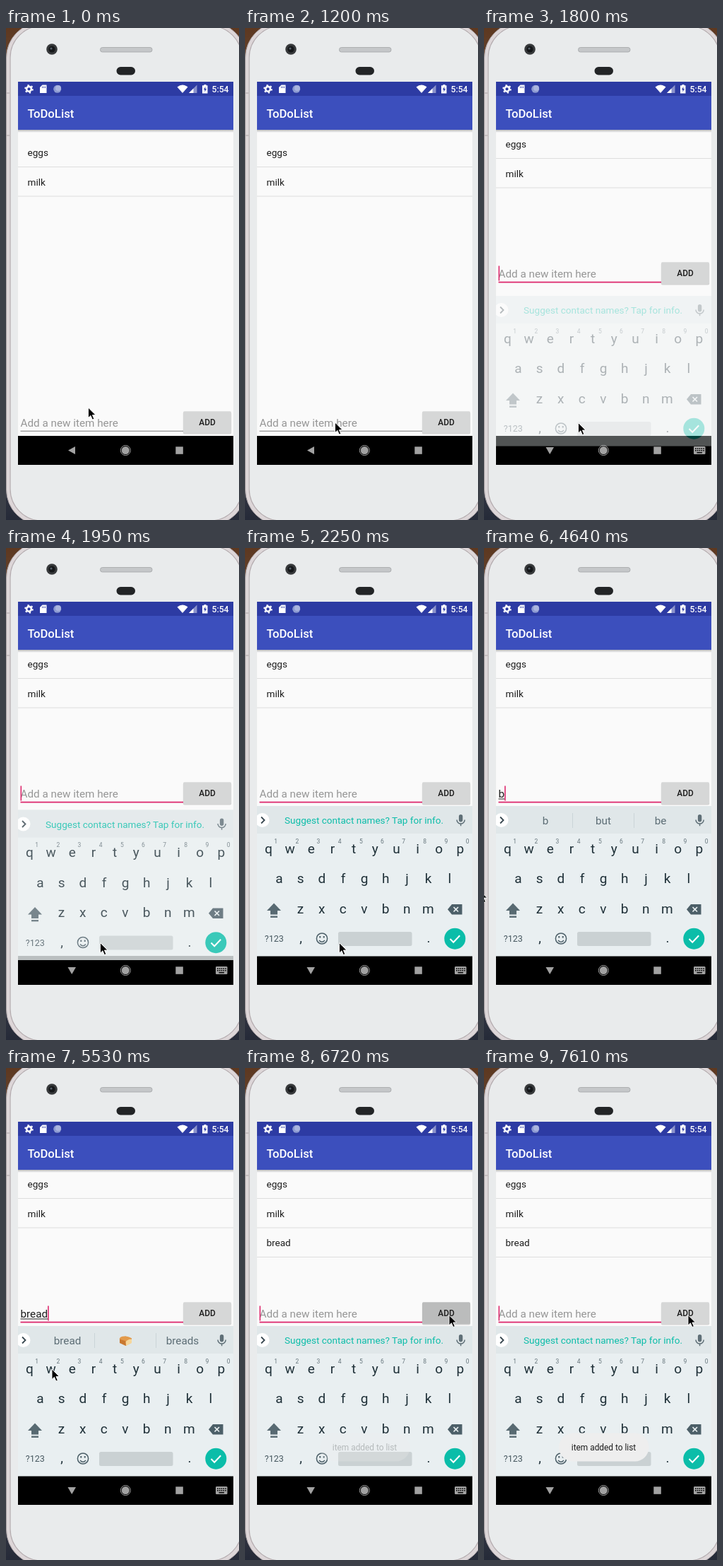
These frames come from a looping animation (330 px wide and 696 px high, 8 s). An HTML page:

```html
<!DOCTYPE html>
<html lang="en">
<head>
<meta charset="utf-8">
<title>To-do list demo</title>
<style>
  html, body { margin: 0; width: 100%; height: 100%; overflow: hidden; background: #3a2a26; }
  svg { display: block; width: 330px; height: 696px; font-family: Roboto, sans-serif; }
  text { white-space: pre; }
  .mid { text-anchor: middle; }
  .item { font-size: 13.55px; fill: #1c1c1c; }
  .field { font-size: 15.25px; }
  .key { font-size: 19px; fill: #1f3038; }
  .num { font-size: 8.5px; fill: #66757c; }
  .word { font-size: 15.25px; fill: #5c6d75; }
</style>
</head>
<body>
<svg viewBox="0 0 330 696">
  <defs>
    <linearGradient id="desk" x1="0" y1="0" x2="0" y2="1">
      <stop offset="0" stop-color="#5d3820"/><stop offset=".5" stop-color="#8d8587"/><stop offset="1" stop-color="#252a38"/>
    </linearGradient>
    <linearGradient id="drop" x1="0" y1="0" x2="0" y2="1">
      <stop offset="0" stop-color="#000" stop-opacity=".26"/><stop offset="1" stop-color="#000" stop-opacity="0"/>
    </linearGradient>
    <clipPath id="glass"><rect x="17" y="76" width="305" height="542"/></clipPath>
  </defs>

  <!-- phone -->
  <rect width="330" height="696" fill="url(#desk)"/>
  <rect x=".5" y="-8" width="339" height="711" rx="50" fill="#ddd6d8" stroke="#aaa2a5"/>
  <rect x="6" y="-3" width="328" height="700" rx="45" fill="#e9ebec" stroke="#b5adb0" stroke-width="1.2"/>
  <path d="M1 92h4M1 152h4" stroke="#aaa2a5"/>
  <circle cx="65" cy="30" r="7.8" fill="#37393b"/>
  <circle cx="65" cy="30" r="4.6" fill="#151719"/>
  <circle cx="64" cy="29" r="1.6" fill="#56606a"/>
  <rect x="133.5" y="27.5" width="73.500" height="6.500" rx="3" fill="#c5c7c9" stroke="#a3a5a7" stroke-width=".8"/>
  <rect x="156.500" y="55" width="26.500" height="11.500" rx="5.700" fill="#222426"/>

  <g clip-path="url(#glass)">
    <rect x="17" y="76" width="305" height="542" fill="#fafafa"/>
    <g id="list"></g>

    <!-- app bars -->
    <rect x="17" y="144" width="305" height="4" fill="url(#drop)"/>
    <rect x="17" y="96" width="305" height="48" fill="#3c4fbd"/>
    <rect x="17" y="76" width="305" height="20" fill="#2d3ba3"/>
    <text x="30.500" y="126.700" font-size="16.700" font-weight="500" fill="#fff">ToDoList</text>
    <g fill="#fff">
      <circle cx="32.500" cy="86.300" r="3.400" fill="none" stroke="#fff" stroke-width="2.600"/>
      <circle cx="32.500" cy="86.300" r="5.300" fill="none" stroke="#fff" stroke-width="2" stroke-dasharray="2.300 3.250"/>
      <path d="M51.500 80.500h6v11.500h-9.500v-8z"/>
      <path d="M51.500 82.500v2.500m2-2.500v2.500m2-2.500v2.500" stroke="#2d3ba3" stroke-width=".8"/>
      <circle cx="72.700" cy="86.300" r="5.500" fill="#8d9bd2"/>
      <circle cx="74" cy="85" r="4" fill="#a9b4df"/>
      <path d="M242.500 83.500Q250 77.500 257.500 83.500L250 92z"/>
      <path d="M270.500 80.500V92H259z" opacity=".45"/>
      <path d="M265.500 85.500V92H259z"/>
      <path d="M280.500 80h3v1.300h2V92.500h-7.500V81.300h2.500z"/>
      <path d="M282.400 83l-2.500 4.200h1.600v3.300l2.500-4.400h-1.600z" fill="#2d3ba3"/>
      <text x="291.500" y="90.800" font-size="12.200" font-weight="500">5:54</text>
    </g>

    <!-- input row, drawn at its raised position -->
    <g id="row">
      <text id="hint" class="field" x="20.500" y="353" fill="#969696">Add a new item here</text>
      <text id="typed" class="field" x="20.500" y="353" fill="#1c1c1c"></text>
      <rect id="under" x="20.500" y="354.500" height="1" fill="#222"/>
      <rect id="line" x="20.500" width="231"/>
      <rect id="caret" y="336.500" width="1.600" height="21" fill="#dd2a6e"/>
      <rect x="250.800" y="332.500" width="68.400" height="31" rx="2" fill="#000" opacity=".16"/>
      <rect id="button" x="251" y="331.300" width="68" height="31" rx="1.700"/>
      <text class="mid" x="285" y="350.900" font-size="11.860" font-weight="500" fill="#1c1c1c">ADD</text>
    </g>

    <!-- navigation -->
    <rect x="17" y="577" width="305" height="41" fill="#000"/>
    <g fill="#a2a2a2">
      <path id="back"/>
      <circle cx="169.300" cy="597.500" r="5.500"/>
      <circle cx="169.300" cy="597.500" r="7" fill="none" stroke="#a2a2a2"/>
      <rect x="240.300" y="592.300" width="10.500" height="10.500"/>
      <g id="switch">
        <rect x="297" y="592" width="16.500" height="11" rx="1.300"/>
        <path d="M299 595h13M299 597.700h13" stroke="#000" stroke-width="1.500" stroke-dasharray="1.600 1.200"/>
        <path d="M301.500 600.700h7.500" stroke="#000" stroke-width="1.400"/>
      </g>
    </g>

    <!-- keyboard -->
    <g id="board">
      <rect x="17" y="365" width="305" height="212.500" fill="#e9eff1"/>
      <rect x="17" y="365" width="305" height="39" fill="#e0e7e9"/>
      <circle cx="24.500" cy="385" r="10" fill="#fff"/>
      <path d="M23 380.500l4.500 4.500l-4.500 4.500" fill="none" stroke="#37474f" stroke-width="1.800"/>
      <g fill="#5f6f77">
        <rect x="302.900" y="377" width="5.400" height="10.500" rx="2.700"/>
        <path d="M300 384.500a5.600 5.600 0 0 0 11.200 0M305.600 390v3.300" fill="none" stroke="#5f6f77" stroke-width="1.500"/>
      </g>
      <text id="tip" class="mid" x="168.500" y="390" font-size="13.550" fill="#0bbda9">Suggest contact names? Tap for info.</text>
      <g id="words">
        <path d="M125.500 375v21M212.500 375v21" stroke="#cbd4d7"/>
        <text class="word mid" x="87" y="391"></text>
        <text class="word mid" x="169" y="391"></text>
        <text class="word mid" x="250" y="391"></text>
        <g id="loaf">
          <path d="M161 383l8-3.500l9 3v6l-8.500 4.500l-8.500-4z" fill="#c9782f"/>
          <path d="M160.500 383.500q1-4 7-4q8 0 10.500 3.500l-8 3.500z" fill="#e39a4b"/>
          <path d="M169.500 387q4-4 8.500-3.500v5.500l-8 4z" fill="#f6d79b"/>
        </g>
      </g>
      <g id="keys"></g>
      <g fill="#586a72">
        <path d="M41 502.500L51 513H46V518.500H36V513H31z"/>
        <rect x="36" y="520.500" width="10" height="2.400"/>
        <path d="M293 504h14.500v14.500H293L287 511.250z" fill="#4c5f68"/>
        <path d="M295.500 508l6.500 6.500m0-6.500l-6.500 6.500" stroke="#e9eff1" stroke-width="1.700"/>
      </g>
      <text class="mid" x="41.300" y="557.300" font-size="12.500" fill="#46575f">?123</text>
      <text class="key mid" x="79" y="558">,</text>
      <text class="key mid" x="260" y="558">.</text>
      <g fill="none" stroke="#4c5f68" stroke-width="1.500">
        <circle cx="109" cy="552.500" r="7.600"/>
        <path d="M105 555q4 4.500 8 0"/>
        <path d="M106.300 549v2.400m5.400-2.400v2.400" stroke-width="2"/>
      </g>
      <rect x="132" y="543" width="104.500" height="20" rx="2.500" fill="#cad1d3"/>
      <circle cx="297.300" cy="552.700" r="15" fill="#0bbda9"/>
      <path d="M290.500 553l4.700 4.700l9-9.500" fill="none" stroke="#fff" stroke-width="2"/>
    </g>

    <g id="toast">
      <rect x="106" y="516.500" width="127.500" height="40" rx="20" fill="#eeeeee"/>
      <text class="mid" x="169.500" y="541" font-size="11.860" fill="#1d1d1d">item added to list</text>
    </g>
  </g>

  <path id="mouse" d="M0 0V14.500L3.400 11.300L5.900 17L8.300 16L5.900 10.500H10.500z" fill="#000" stroke="#fff" stroke-width=".9"/>
</svg>

<script>
const LOOP = 8000;
const RAISE = 211;
const NS = "http://www.w3.org/2000/svg";
const $ = id => document.getElementById(id);

function add(parent, tag, attrs, text = "") {
  const el = parent.appendChild(document.createElementNS(NS, tag));
  for (const k in attrs) el.setAttribute(k, attrs[k]);
  el.textContent = text;
  return el;
}
const set = (el, attrs) => { for (const k in attrs) el.setAttribute(k, attrs[k]); };
const show = (el, on) => el.setAttribute("visibility", on ? "visible" : "hidden");

// Latest step whose start time has passed.
const at = (steps, t) => steps.findLast(s => s[0] <= t);

const rows = ["eggs", "milk", "bread"].map((name, i) => {
  const g = add($("list"), "g", {});
  add(g, "text", { class: "item", x: 30.5, y: 169 + 41.5 * i }, name);
  add(g, "rect", { x: 17, y: 184 + 41.5 * i, width: 305, height: 1, fill: "#dedede" });
  return g;
});

["qwertyuiop", "asdfghjkl", "zxcvbnm"].forEach((keys, r) => {
  const left = [33.5, 48.5, 78.5][r];
  [...keys].forEach((k, i) => {
    const x = left + 30.15 * i;
    add($("keys"), "text", { class: "key mid", x, y: 431.7 + 42.5 * r }, k);
    if (!r) add($("keys"), "text", { class: "num mid", x: x + 10.2, y: 417.5 }, (i + 1) % 10);
  });
});

const MOUSE = [
  [0, 116.5, 537], [150, 114.5, 543], [300, 111, 552], [450, 110, 558],
  [1200, 127.500, 558], [1350, 133.500, 558.5], [2540, 131, 545], [2690, 126, 524],
  [2840, -6, 484.5], [5530, 65, 426], [5680, 180, 372], [5820, 278, 346],
  [6120, 287, 349], [6270, 289, 349.5]
];
const BLINK = [0, 1650, 2250, 2840, 3290, 3890, 4340, 4640, 5820, 6270, 7170, 7610]
  .map((t, i) => [t, i % 2]);
const TYPED = [
  [0, ""], [4640, "b", "b", "but", "be"], [4790, "br", "br", "bro", "bring"],
  [4930, "brea", "brea", "bread", "break"], [5230, "bread", "bread", "", "breads"], [6720, ""]
];
// time, opacity, downward offset
const BOARD = [[0, 0, 0], [1800, .35, 14], [1950, .8, 5.5], [2100, 1, 0]];
const TOAST = [[0, 0], [6720, .25], [6870, .75], [7020, 1]];
const BUTTON = [[0, "#d6d7d7"], [6570, "#c4c5c5"], [6720, "#bbbcbc"], [6870, "#c6c7c7"], [7020, "#d0d1d1"], [7170, "#d6d7d7"]];

const slots = $("words").querySelectorAll("text");

function draw(t) {
  const open = t >= 1800, focus = t >= 1650;
  const [, mx, my] = at(MOUSE, t);
  const [, alpha, drop] = at(BOARD, t);
  const [, typed, ...words] = at(TYPED, t);

  set($("mouse"), { transform: `translate(${mx} ${my})` });
  set($("list"), { transform: `translate(0 ${open ? 0 : 12})` });
  show(rows[2], t >= 6720);

  set($("row"), { transform: `translate(0 ${open ? 0 : RAISE})` });
  set($("line"), focus
    ? { y: 358.700, height: 1.800, fill: "#dd2a6e" }
    : { y: 358.700, height: 1.100, fill: "#858585" });
  $("typed").textContent = typed;
  const w = typed ? $("typed").getComputedTextLength() : 0;
  show($("hint"), !typed);
  set($("under"), { width: w });
  set($("caret"), { x: 20.5 + w });
  show($("caret"), at(BLINK, t)[1]);
  set($("button"), { fill: at(BUTTON, t)[1] });

  set($("back"), { d: open ? "M87.500 593H99L93.250 603z" : "M98 592V603L88 597.500z" });
  show($("switch"), open);
  set($("board"), { opacity: alpha, transform: `translate(0 ${drop})` });
  show($("tip"), !typed);
  show($("words"), typed);
  show($("loaf"), typed === "bread");
  slots.forEach((s, i) => s.textContent = words[i] || "");
  set($("toast"), { opacity: at(TOAST, t)[1] });
}

const start = performance.now();
function tick() {
  draw((performance.now() - start) % LOOP);
  requestAnimationFrame(tick);
}
tick();
</script>
</body>
</html>
```
